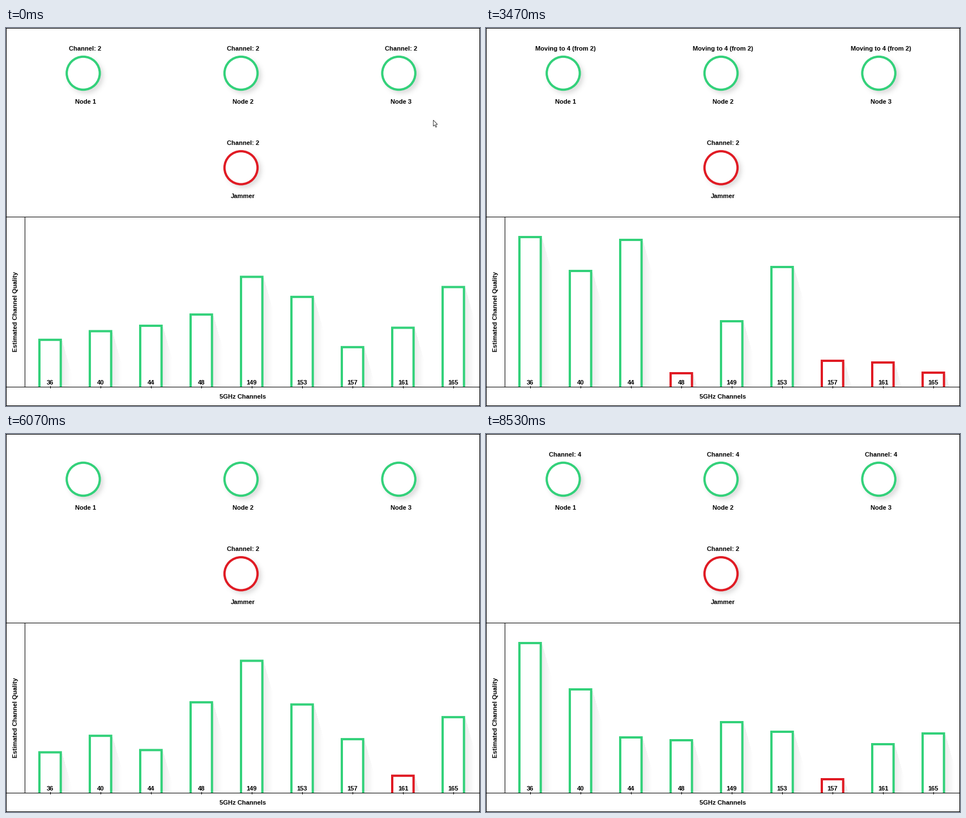
Write a matplotlib script that moves like this. It is 837x669 px and loops after 9.47 s.

```python
import numpy as np
import matplotlib.pyplot as plt
from matplotlib.animation import FuncAnimation
from matplotlib.collections import PolyCollection
from matplotlib.patches import Circle, Polygon

W, H, DPI = 837, 669, 64
PT = 72 / DPI  # points per pixel
LOOP, FRAMES = 9470, 473
STEP = 1000 / 15  # the picture advances 15 times a second
LEAD = 15

GREEN, RED = "#33d17a", "#e01b24"
CHANNELS = [*range(36, 49, 4), *range(149, 166, 4)]
PITCH, BAR_W = 89, 37.7
BASE = 635.5
LOW = 584  # bars whose top is below this line turn red

# bar tops after each measuring round; the loop opens on the last one mirrored
rounds = [
    [572, 522, 440, 485, 368, 407, 591, 608, 546],
    [368, 428, 373, 609, 517, 421, 587, 590, 608],
    [527, 522, 492, 368, 440, 537, 608, 609, 498],
    [588, 540, 608, 554, 368, 430, 484, 598, 500],
    [368, 450, 535, 540, 508, 525, 609, 547, 528],
]
ROUNDS = np.array([rounds[-1][::-1], *rounds])
PERIOD, MOVE, OFFSET = 2000, 1000, 497

SWITCH_START, SWITCH_END, BLINK_PHASE = 1503, 7503, 1420

plt.rcParams["font.family"] = "Liberation Sans"
fig = plt.figure(figsize=(W / DPI, H / DPI), dpi=DPI, facecolor="white")
ax = fig.add_axes([0, 0, 1, 1])
ax.axis("off")


def label(x, y, text, **kw):
    return ax.text(x, y, text, size=11.1 * PT, weight="bold", color="black",
                   ha="center", va="baseline", zorder=6, **kw)


def line(x0, y0, x1, y1):
    ax.plot([x0, x1], [y0, y1], color="black", lw=PT, zorder=5,
            solid_capstyle="butt", snap=False)


def soft_disc(x, y, radius=31, size=96):
    half = size / 2
    axis = np.arange(size) + 0.5 - half
    dist = np.hypot(*np.meshgrid(axis, axis))
    img = np.zeros((size, size, 4))
    img[..., 3] = 0.13 / (1 + np.exp((dist - radius) / 2.4))
    ax.imshow(img, extent=(x - half, x + half, y + half, y - half),
              aspect="auto", interpolation="nearest", zorder=1)


def node(x, y, name, color):
    soft_disc(x + 5, y + 5)
    ax.add_patch(Circle((x, y), 29.2, fc="white", ec=color, lw=4 * PT, zorder=2))
    label(x + 3.7, y + 54, name)
    return label(x + 3.7, y - 40, "Channel: 2")


node_labels = [node(136.4 + 278.6 * i, 80, f"Node {i + 1}", GREEN)
               for i in range(3)]
node(415, 247.3, "Jammer", RED)

# outer border and chart axes
for x in (0.5, W - 0.5):
    line(x, 0, x, H)
for y in (0.5, 334.5, BASE, H - 0.5):
    line(0, y, W, y)
line(33.5, 334.5, 33.5, BASE)
label(418.5, 656, "5GHz Channels")
label(20.5, 502, "Estimated Channel Quality", rotation=90,
      rotation_mode="anchor")

lefts = 59 + PITCH * np.arange(len(CHANNELS))
bars = []
for x, channel in zip(lefts, CHANNELS):
    bars += ax.plot([], [], lw=4 * PT, solid_joinstyle="miter",
                    solid_capstyle="butt", zorder=4, snap=False)
    label(x + 19, 631, str(channel))
    line(x + 19.5, 633.5, x + 19.5, 638)

# slanted shadows, built from one-pixel columns that fade out
COLS, SLOPE = 17, 3.55
fade = 0.925 + 0.075 * np.arange(COLS) / COLS
shadows = PolyCollection([], facecolors=[str(g) for g in fade] * len(bars),
                         edgecolors="none", antialiased=False, zorder=1)
ax.add_collection(shadows, autolim=False)


def shadow_columns(x, top):
    edge = np.minimum(top + SLOPE * np.arange(COLS + 1), BASE)
    return [[(x + j, BASE), (x + j, edge[j]), (x + j + 1, edge[j + 1]),
             (x + j + 1, BASE)] for j in range(COLS)]


# mouse pointer, leaving upwards
ARROW = np.array([(0, 0), (0, 10.8), (2.5, 8.6), (4.4, 12.6), (6, 11.9),
                  (4.2, 7.9), (7.4, 7.6)])
pointer = Polygon(ARROW, fc="white", ec="#333333", lw=0.9 * PT, zorder=7)
ax.add_patch(pointer)

ax.set_xlim(0, W)
ax.set_ylim(H, 0)


def node_text(t):
    if t < SWITCH_START:
        return "Channel: 2"
    if t >= SWITCH_END:
        return "Channel: 4"
    lit = (t - BLINK_PHASE) % 1000 < 500
    return "Moving to 4 (from 2)" if lit else ""


def bar_tops(t):
    n, elapsed = divmod(t + OFFSET, PERIOD)
    old, new = ROUNDS[int(n)], ROUNDS[int(n) + 1]
    return old + (new - old) * min(elapsed / MOVE, 1)


def update(i):
    step = int((i * LOOP / FRAMES + LEAD) / STEP)
    t = step * STEP

    for item in node_labels:
        item.set_text(node_text(t))

    quads = []
    for bar, x, top in zip(bars, lefts, bar_tops(t)):
        right = x + BAR_W
        bar.set_data([x, x, right, right], [BASE, top + 2, top + 2, BASE])
        bar.set_color(RED if top > LOW else GREEN)
        quads += shadow_columns(right + 2, top + 4)
    shadows.set_verts(quads)

    pointer.set_xy(ARROW + (754.5 + 4 * step, 163 - 61 * step))
    pointer.set_visible(step < 3)


anim = FuncAnimation(fig, update, frames=FRAMES, interval=LOOP / FRAMES,
                     repeat=True, repeat_delay=0, blit=False)
plt.show()
```
